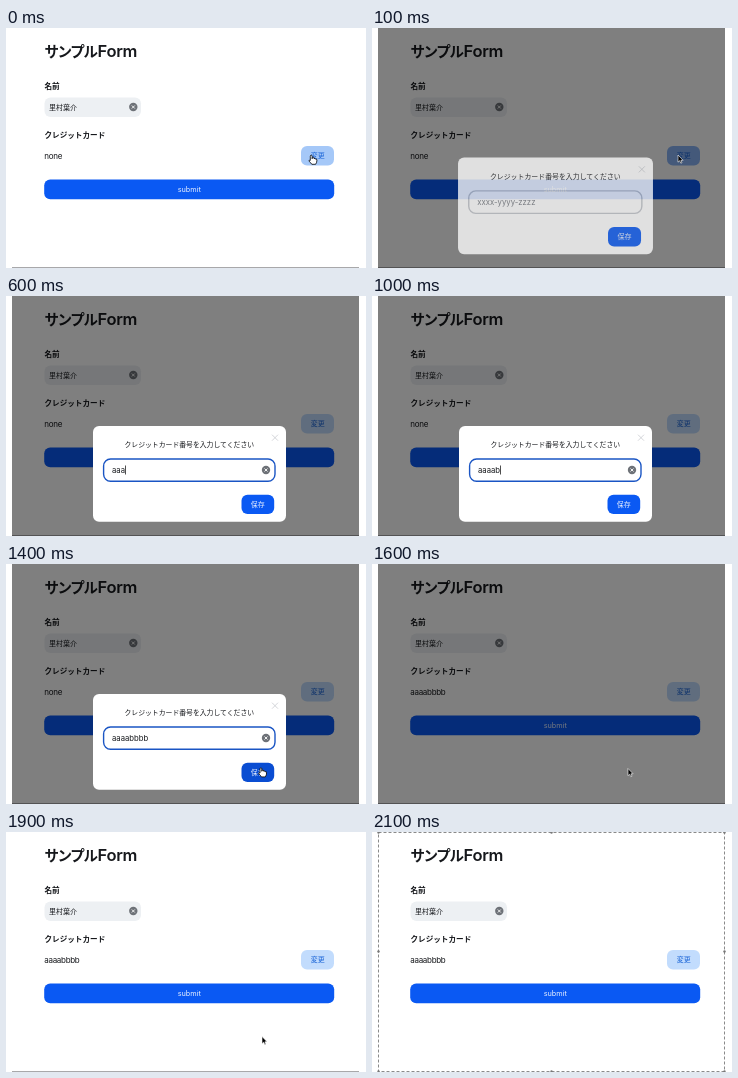
Write an HTML page that moves like this. It is 360 by 240 pixels and loops after 2400 ms.

```html
<!DOCTYPE html>
<html lang="ja">
<head>
<meta charset="utf-8">
<title>サンプルForm</title>
<style>
  html, body { margin: 0; width: 100%; height: 100%; overflow: hidden; background: #fff; }
  svg { display: block; width: 360px; height: 240px; }
  text { font: 7.3px Inter, "Noto Sans CJK JP", "Noto Sans CJK", sans-serif; fill: #16181c; }
  .title { font-size: 14.5px; font-weight: 600; letter-spacing: -.3px; font-feature-settings: "palt"; }
  .title tspan { font-size: 16.5px; }
  .label { font-size: 7.6px; font-weight: 600; }
  .value { font-size: 8px; letter-spacing: -.3px; }
  .prompt { font-size: 6.85px; }
  .small { font-size: 7px; }
  .field { font-size: 7.7px; }
  .mid { text-anchor: middle; }
  .light { fill: #e9f0ff; }
  .link { fill: #1762d6; }
  .blue { fill: #0a59f3; }
</style>
</head>
<body>
<svg viewBox="0 0 360 240">
  <defs>
    <g id="clear">
      <circle r="4.2" fill="#6e7278"/>
      <path d="M-1.5-1.5l3 3m0-3l-3 3" stroke="#fff" stroke-width=".9"/>
    </g>
  </defs>

  <text class="title" x="38.5" y="28.5">サンプル<tspan>Form</tspan></text>
  <text class="label" x="38.5" y="61.2">名前</text>
  <rect x="38.5" y="69.5" width="96.5" height="19.5" rx="6" fill="#edf0f3"/>
  <text class="small" x="43" y="81.7">里村葉介</text>
  <use href="#clear" x="127.3" y="79"/>
  <text class="label" x="38.5" y="109.8">クレジットカード</text>
  <text id="card" class="value" x="38.3" y="130.8"></text>
  <rect id="change" x="295" y="118" width="33" height="19.5" rx="6"/>
  <text class="small mid link" x="311.7" y="130.3">変更</text>
  <rect class="blue" x="38.2" y="151.5" width="290" height="19.7" rx="6"/>
  <text class="mid light" x="183.3" y="163.8">submit</text>
  <path d="M6 239.5H353" stroke="#a8a8aa"/>

  <rect id="shade" x="6" width="347" height="240" opacity=".5"/>

  <g id="modal">
    <rect x="87" y="130" width="193" height="95.7" rx="6" fill="#fff"/>
    <text class="prompt mid" x="183.3" y="151.2">クレジットカード番号を入力してください</text>
    <path d="M266 138.7l6 6m0-6l-6 6" stroke="#c9ccd1" stroke-width=".8"/>
    <rect id="box" x="97.6" y="163" width="171.4" height="22.3" rx="7" fill="#fff" stroke-width="1.4"/>
    <text id="entry" class="field" x="106" y="177.2"></text>
    <rect id="caret" y="169.5" width=".8" height="9" fill="#222"/>
    <use id="erase" href="#clear" x="260" y="174"/>
    <rect id="save" x="235.5" y="198.8" width="32.7" height="19.3" rx="6"/>
    <text class="small mid light" x="251.8" y="211">保存</text>
  </g>

  <g id="cursor" stroke-linejoin="round">
    <path id="arrow" d="M0 0V7.2L1.7 5.7 2.8 8.2 4 7.7 2.9 5.3H5.1Z" fill="#000" stroke="#fff" stroke-width=".6"/>
    <path id="hand" d="M1 .9Q1-.2 1.9-.2T2.8.9V3.3Q4-.1 4.8 3.3 6 2.3 6.3 3.8 7.6 3.2 7.6 4.8 7.7 7 6.3 8.9H2.5Q1.7 7.4-.4 5.7-.3 4.3 1 5Z" fill="#fff" stroke="#000" stroke-width=".8"/>
    <path id="beam" d="M-1.5-4Q0-4 0-3V3Q0 4-1.5 4M1.5-4Q0-4 0-3M0 3Q0 4 1.5 4" fill="none" stroke="#222" stroke-width=".8"/>
  </g>

  <g id="frame">
    <rect x="6.5" y=".5" width="346" height="239" fill="none" stroke="#fff"/>
    <rect x="6.5" y=".5" width="346" height="239" fill="none" stroke="#8a8a8a" stroke-dasharray="3 2"/>
    <g id="grips" fill="#777"></g>
  </g>
</svg>
<script>
const $ = id => document.getElementById(id);
const show = (id, on) => $(id).style.display = on ? "" : "none";
const set = (id, attrs) => { for (const k in attrs) $(id).setAttribute(k, attrs[k]); };

for (const x of [6.5, 179.5, 352.5])
  for (const y of [.5, 119.5, 239.5])
    if (x !== 179.5 || y !== 119.5)
      $("grips").innerHTML += `<circle cx="${x}" cy="${y}" r="1.2"/>`;

// [start, kind, x, y]
const pointer = [
  [0, "hand", 303.3, 127.4], [100, "arrow", 306, 127], [200, "arrow", 250, 152],
  [300, "beam", 184, 174], [400, ""], [1400, "hand", 253, 204],
  [1500, "arrow", 256, 204.5], [2000, ""]
];
const keyTimes = [400, 500, 600, 800, 1000, 1100, 1200, 1300];
const number = "aaaabbbb";

function draw(now) {
  const t = Math.floor(now % 2400 / 100) * 100;
  const typed = number.slice(0, keyTimes.filter(k => k <= t).length);
  const focused = t >= 300;
  const opacity = t === 100 ? .76 : t === 1500 ? .35 : 1;
  const scale = t === 100 ? 1.01 : t === 1500 ? 1.02 : 1;

  $("card").textContent = t < 1500 ? "none" : number;
  set("change", { fill: t < 100 ? "#a5c8f8" : t < 200 ? "#8ab4f5" : "#c2dcfd" });
  show("shade", t >= 100 && t < 1700);

  show("modal", t >= 100 && t < 1600);
  set("modal", {
    opacity,
    transform: `translate(183.5 177.8) scale(${scale}) translate(-183.5 -177.8)`
  });
  set("box", { stroke: focused ? "#1a55c4" : "#c3c6cc" });
  $("entry").textContent = typed || "xxxx-yyyy-zzzz";
  $("entry").style.fill = typed ? "#16181c" : "#777b82";
  show("caret", focused && t !== 900 && t < 1400);
  set("caret", { x: 106.2 + (typed ? $("entry").getComputedTextLength() : 0) });
  show("erase", typed);
  set("save", { fill: t === 1400 ? "#0a4dd2" : "#0a59f3" });

  const [, kind, x = 0, y = 0] = pointer.findLast(p => p[0] <= t);
  for (const id of ["arrow", "hand", "beam"]) show(id, id === kind);
  set("cursor", { transform: `translate(${x} ${y})` });
  show("frame", t >= 2000);
}

const start = performance.now();
function tick() {
  draw(performance.now() - start);
  requestAnimationFrame(tick);
}
tick();
</script>
</body>
</html>
```
